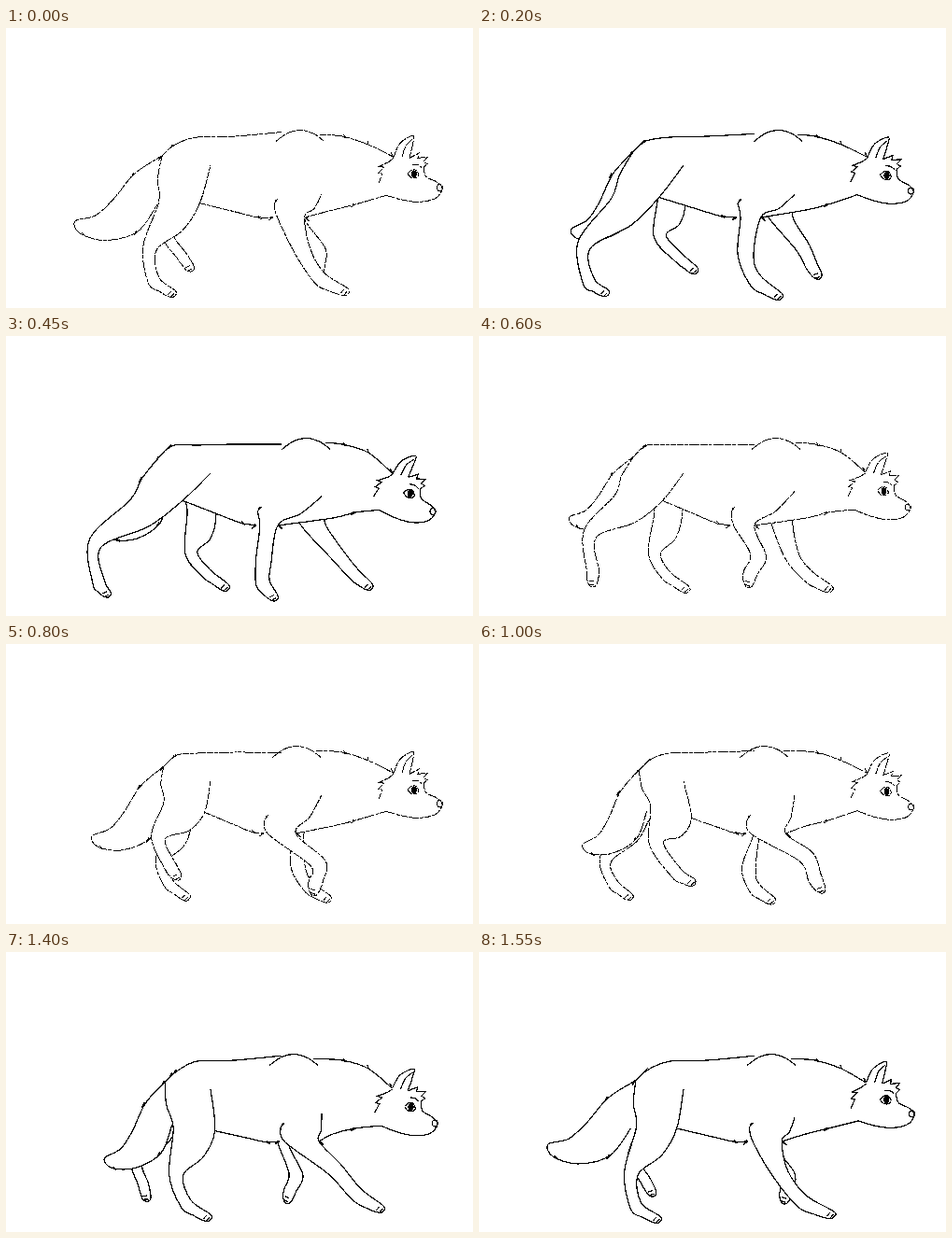
Write an HTML page that moves like this. It is 500 px wide and 300 px high and loops after 1.6 s.

```html
<!DOCTYPE html>
<html lang="en">
<head>
<meta charset="utf-8">
<title>Wolf walk cycle</title>
<style>
  html, body { margin: 0; width: 100%; height: 100%; overflow: hidden; background: #fff; }
  svg { display: block; width: 500px; height: 300px; shape-rendering: crispEdges; }
  path { fill: none; stroke: #000; stroke-width: 1.25; }
  .skin { fill: #fff; }
  .ink { fill: #000; }
  .mask { fill: #fff; stroke: none; }
  .rough path { stroke-width: 1; stroke-dasharray: 7 1 4 1.5 11 1; }
</style>
</head>
<body>
<svg id="stage" viewBox="0 0 500 300"></svg>
<script>
const LOOP = 1600, STEP = 50;
const KEYS = [0, 350, 600, 800, 1000, 1250, 1550];

// Closed paths (x, y per key time) of the near leg joints, and the point
// towards which the smaller far leg is drawn.
const HIND = [
  { rest: [205, 229], path: [154,236, 92,228, 119,212, 163,208, 190,214, 196,237, 163,237] },
  { rest: [222, 247], path: [158,270, 97,270, 122,252, 177,240, 212,246, 212,265, 168,272] },
  { rest: [238, 262], path: [178,284, 112,281, 122,265, 184,249, 228,255, 234,279, 191,286] }
];
const FORE = [
  { rest: [320, 240], path: [318,240, 270,245, 299,235, 334,235, 350,228, 372,228, 323,238] },
  { rest: [320, 256], path: [336,268, 275,270, 291,253, 332,253, 359,249, 394,253, 346,267] },
  { rest: [320, 266], path: [363,282, 296,287, 289,266, 330,266, 367,263, 413,269, 377,281] }
];
const TAIL_TIP = [74,207, 112,218, 97,194, 92,206, 111,215, 130,232, 74,206];

// Tail outline: along and across the line from root to tip.
const TAIL = [[0, 0], [.3, -.02], [.6, .05], [.82, .07], [1, 0],
  [1.03, .12], [.88, .31], [.6, .42], [.3, .33]];

// Head outlines, measured from the eye.
const FACE = [[11, -7], [14, 3], [26, 9], [31, 16], [24, 26], [7, 30], [-11, 28], [-29, 23]];
const EAR = [[-21, -18], [-14, -33], [0, -41], [-1, -30], [-4, -17]];
const EAR_FOLD = [[-12, -18], [-8, -30], [-1, -37]];
const BROW = [[-4, -17], [6, -22], [5, -17], [15, -18], [11, -13], [15, -11], [11, -7]];
const CHEEK = [[-21, -17], [-26, -13], [-36, -8], [-31, -7], [-37, -1], [-33, 0], [-37, 10]];
const LID = [[-6, 0], [-2, -4], [3, -4], [6, 1]];
const LASH = [[-6, 0], [-2, 4], [4, 4], [6, 1]];
const FROWN = [[-1, -10], [4, -10], [9, -7]];

const add = (p, x, y) => [p[0] + x, p[1] + y];
const mix = (p, q, k) => [p[0] + (q[0] - p[0]) * k, p[1] + (q[1] - p[1]) * k];

// Sine swing that is highest at the given time, n times per loop.
const swing = (t, mean, amp, peak, n = 1) =>
  mean + amp * Math.cos(2 * Math.PI * n * (t - peak) / LOOP);

// Smooth position on a closed key path.
function along(path, time) {
  const t = time % LOOP, n = KEYS.length;
  const k = KEYS.findLastIndex(key => key <= t);
  const near = [k - 1, k, k + 1, k + 2];
  const [ta, tb, tc, td] = near.map(i => KEYS[(i + n) % n] + LOOP * Math.floor(i / n));
  const len = tc - tb, u = (t - tb) / len, v = 1 - u;
  return [0, 1].map(axis => {
    const [a, b, c, d] = near.map(i => path[2 * ((i + n) % n) + axis]);
    const m0 = (c - a) / (tc - ta) * len, m1 = (d - b) / (td - tb) * len;
    return b * (1 + 2 * u) * v * v + c * u * u * (3 - 2 * u) + m0 * u * v * v - m1 * u * u * v;
  });
}

const fmt = p => p.map(n => n.toFixed(1)).join(' ');
const draw = (d, cls = '') => `<path class="${cls}" d="${d}"/>`;
const line = (pts, cls) => draw('M' + pts.map(fmt).join('L'), cls);

function curve(pts, cls) {
  let d = 'M' + fmt(pts[0]);
  for (let i = 0; i < pts.length - 1; i++) {
    const a = pts[i - 1] || pts[i], b = pts[i], c = pts[i + 1], e = pts[i + 2] || c;
    const p = add(b, (c[0] - a[0]) / 6, (c[1] - a[1]) / 6);
    const q = add(c, (b[0] - e[0]) / 6, (b[1] - e[1]) / 6);
    d += `C${fmt(p)} ${fmt(q)} ${fmt(c)}`;
  }
  return draw(d, cls);
}

const oval = ([x, y], rx, ry, cls) =>
  draw(`M${fmt([x - rx, y])}a${rx} ${ry} 0 1 0 ${2 * rx} 0a${rx} ${ry} 0 1 0 ${-2 * rx} 0`, cls);

// A pointed lock of fur.
const tuft = (p, x, y) => line([p, add(p, x, y), add(p, x / 4, y / 4 - 2)]);

// Moves p forward and sideways relative to the direction from a to b.
function offset(p, a, b, side, ahead = 0) {
  const x = b[0] - a[0], y = b[1] - a[1], len = Math.hypot(x, y);
  return add(p, (x * ahead - y * side) / len, (y * ahead + x * side) / len);
}

// Outline down the rear edge, round the paw and up the front edge.
function limb(rear, [mid, ankle, tip], front, w) {
  const top = mix(rear[0], front[front.length - 1], 0.5);
  const paw = (p, side, ahead) => offset(p, ankle, tip, side, ahead);
  const toe = ahead => line([paw(tip, 4, ahead), paw(tip, -1, ahead + 1)]);
  return curve([
    ...rear,
    offset(mid, top, ankle, w),
    offset(ankle, mid, tip, w - 1),
    paw(mix(ankle, tip, 0.5), w - 1),
    paw(tip, 5), paw(tip, 1, 4), paw(tip, -4, 1),
    offset(ankle, mid, tip, 1 - w),
    offset(mid, top, ankle, -w),
    ...front
  ], 'skin') + toe(-3) + toe(1);
}

const joints = (leg, t, far) => leg.map(({ rest, path }) => {
  const p = along(path, t);
  return far ? [mix(p, rest, 0.25)[0], mix(p, rest, 0.6)[1]] : p;
});

const rumpAt = t => [swing(t, 168, 4, 1150), swing(t, 134, 5, 1350)];
const flankAt = t => [swing(t, 210, -22, 370), swing(t, 184, -8, 520)];
const elbowAt = t => [swing(t, 282, -13, 500), 188];
const chestAt = t => [swing(t, 315, -24, 450), 203];

function hindLeg(t, far) {
  const leg = joints(HIND, t, far), hock = leg[0];
  const rump = add(rumpAt(t), far ? 12 : 0, 0), flank = add(flankAt(t), far ? -6 : 0, 0);
  const thigh = add(mix(rump, hock, 0.5), 3, 0);
  const stifle = add(mix(hock, flank, 0.55), 6, 7);
  return limb([rump, add(mix(rump, thigh, 0.5), -3, 0), thigh], leg,
    [stifle, flank, [219, 147]], far ? 6.5 : 7.5);
}

function foreLeg(t, far) {
  const elbow = add(elbowAt(t), far ? 18 : 0, 0), chest = add(chestAt(t), far ? 4 : 0, 0);
  const shoulder = [338, swing(t, 170, -9, 900)];
  return limb([elbow, add(mix(elbow, chest, 0.12), 0, 14)], joints(FORE, t, far),
    [chest, add(mix(chest, shoulder, 0.5), 1, 3), shoulder], far ? 7.5 : 8.5);
}

function tail(t) {
  const root = rumpAt(t), tip = along(TAIL_TIP, t);
  const len = Math.hypot(tip[0] - root[0], tip[1] - root[1]);
  const pts = TAIL.map(([u, v]) => offset(root, root, tip, -v * len, u * len));
  return curve(pts, 'skin') + tuft(pts[1], -4, 4) + tuft(pts[5], 5, 2) + tuft(pts[7], -4, 4);
}

// Places points measured from the eye; the head bobs twice per loop.
function headFrame(t) {
  const x = swing(t, 434, -2.5, 480, 2), y = swing(t, 162, 7, 480, 2);
  const tilt = swing(t, 5, 5, 420, 2) * Math.PI / 180;
  const c = Math.cos(tilt), s = Math.sin(tilt);
  return pts => pts.map(([u, v]) => [x + u * c - v * s, y + u * s + v * c]);
}

function head(place) {
  const face = place(FACE), [pupil] = place([[1, 0]]);
  return curve(face) + curve(place(EAR), 'skin') + curve(place(EAR_FOLD))
    + line(place(BROW)) + line(place(CHEEK))
    + curve(place(LID)) + curve(place(LASH)) + curve(place(FROWN))
    + oval(pupil, 2.5, 3.5, 'ink')
    + oval(offset(face[3], face[3], pupil, 0, 3), 3, 3.5);
}

function wolf(t) {
  const place = headFrame(t), face = place(FACE), [earRoot] = place(EAR);
  const rump = rumpAt(t), flank = flankAt(t), elbow = elbowAt(t), chest = chestAt(t);

  const crest = [swing(t, 314, 9, 350), 109.5];
  const hump = [[-27, 12], [-14, 3], [0, 0], [14, 4], [25, 12]].map(p => add(crest, ...p));
  const back = [rump, add(rump, 14, -12), [205, 117], [245, 116], [295, swing(t, 114, 3, 650)]];
  const nape = [add(crest, 20, 5), [360, 116], [388, 125], earRoot];
  const throat = [face[7], [374, 189], [350, 195], chest];
  const end = add(elbow, -1, 15);
  const belly = [flank, add(mix(flank, end, 0.5), 0, 2), add(mix(flank, end, 0.78), 0, 3), end];

  return hindLeg(t + 800, true) + foreLeg(t + 850, true) + tail(t)
    + line([...back, crest, ...nape, ...face, ...throat, ...belly.toReversed()], 'mask')
    + hindLeg(t) + foreLeg(t)
    + [back, hump, nape, throat, belly].map(pts => curve(pts)).join('')
    + tuft(back[1], -6, 4) + tuft(rump, -4, 5)
    + tuft(nape[1], 5, 2) + tuft(nape[2], -1, -4) + tuft(earRoot, -3, -5)
    + tuft(belly[2], 5, 2) + tuft(end, -5, 3) + tuft(elbow, 4, -5)
    + tuft(throat[1], -5, 3) + tuft(chest, 5, 4)
    + head(place);
}

const stage = document.getElementById('stage');
const start = performance.now();
let shown = -1;

function tick(now) {
  const t = Math.floor((Math.max(0, now - start) % LOOP) / STEP) * STEP;
  if (t !== shown) {
    shown = t;
    stage.classList.toggle('rough', t === 0 || (t >= 600 && t < 1150));
    stage.innerHTML = wolf(t);
  }
  requestAnimationFrame(tick);
}
tick(start);
</script>
</body>
</html>
```
